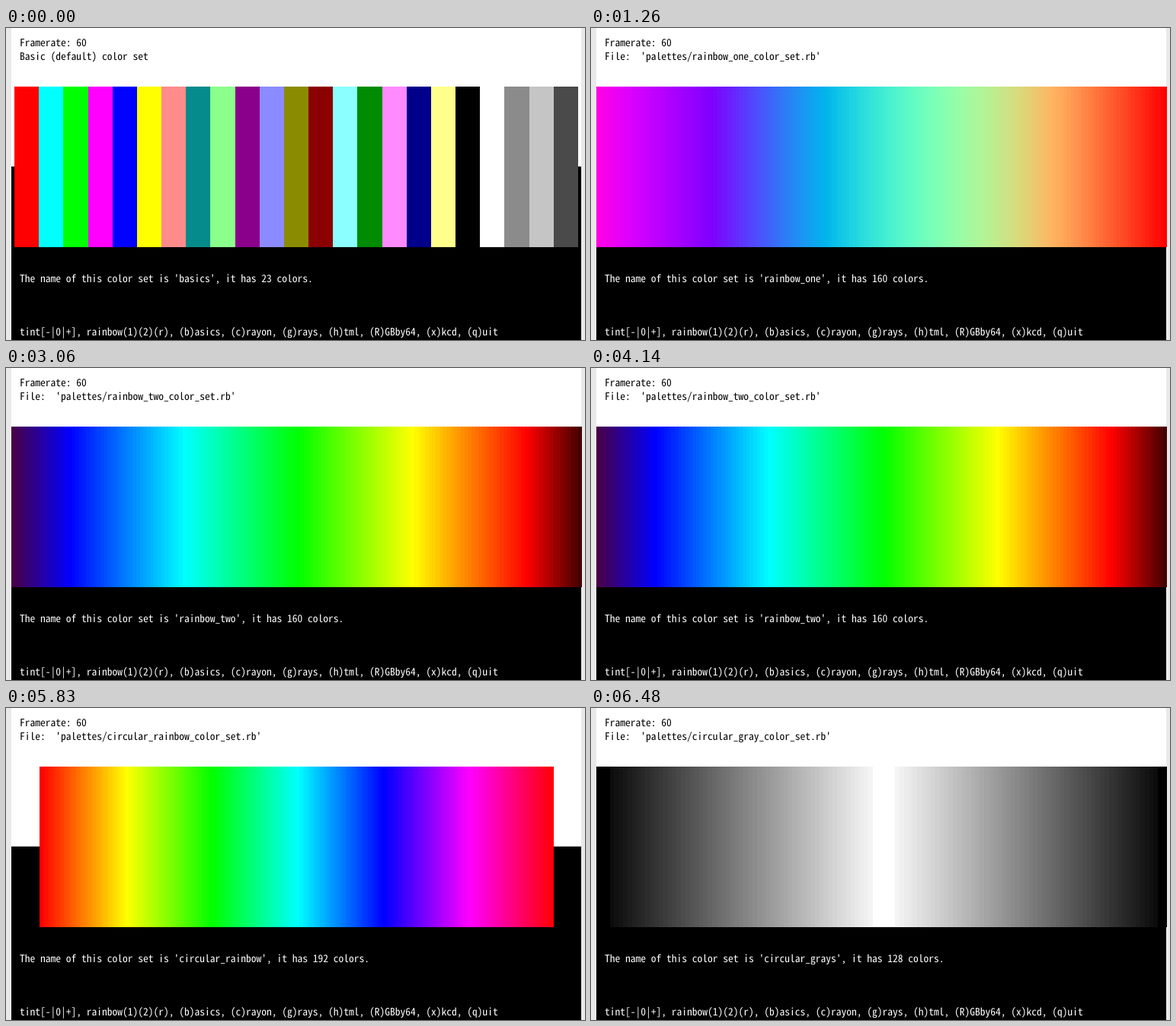
An HTML page with a canvas that plays this animation: 760x410 px, repeating every 8000 ms.

```html
<!DOCTYPE html>
<html lang="en">
<head>
<meta charset="utf-8">
<title>Color sets</title>
<style>
  html, body { margin: 0; width: 100%; height: 100%; overflow: hidden; background: #e9e9e9; }
  canvas, svg { position: absolute; left: 0; top: 0; display: block; }
  text {
    font-family: "Noto Sans Mono CJK JP", "Noto Sans Mono", "DejaVu Sans Mono", monospace;
    font-size: 13.5px;
    font-size-adjust: ch-width 0.5;
    text-rendering: geometricPrecision;
    white-space: pre;
    fill: #fff;
  }
  .dark { fill: #000; }
</style>
</head>
<body>
<canvas id="stage" width="760" height="410"></canvas>
<svg width="760" height="410">
  <text class="dark" x="18" y="24">Framerate: 60</text>
  <text class="dark" id="source" x="18" y="42"></text>
  <text id="summary" x="18" y="334"></text>
  <text x="18" y="404">tint[-|0|+], rainbow(1)(2)(r), (b)asics, (c)rayon, (g)rays, (h)tml, (R)GBby64, (x)kcd, (q)uit</text>
</svg>
<script>
const LOOP = 8000;
const ctx = document.getElementById('stage').getContext('2d');
const source = document.getElementById('source');
const summary = document.getElementById('summary');

const rgb = (r, g, b) => `rgb(${[r, g, b].map(Math.round).join()})`;
const range = (n, fn) => Array.from({ length: n }, (_, i) => fn(i));

// Evenly stepped colors from one [r, g, b] to the next.
const ramp = (from, to, n) =>
  range(n, i => rgb(...from.map((v, k) => v + (to[k] - v) * i / n)));

// Joins ramps of the given lengths through a list of key colors.
const ramps = (keys, lengths) =>
  lengths.flatMap((n, i) => ramp(keys[i], keys[i + 1], n));

const RED = [255, 0, 0], YELLOW = [255, 255, 0], GREEN = [0, 255, 0];
const CYAN = [0, 255, 255], BLUE = [0, 0, 255], MAGENTA = [255, 0, 255];

const basics = ('f00 0ff 0f0 f0f 00f ff0 ff8b8b 058b8b 8bff8b 8b008b 8b8bff 8b8b00 ' +
  '8b0000 8bffff 008b00 ff8bff 00008b ffff8b 000 fff 8b8b8b c5c5c5 4a4a4a')
  .split(' ').map(hex => '#' + hex);

const rainbowOne = [
  ...range(32, i => rgb(255 - 4 * i, 0, Math.min(255, 228 + 3 * i))),
  ...range(128, i => {
    const t = i / 127;
    return rgb(255 * Math.min(1, Math.abs(2 * t - 0.5)),
      255 * Math.sin(Math.PI * t), 255 * Math.cos(Math.PI * t / 2));
  })
];

const rainbowTwo = ramps(
  [[72, 0, 72], BLUE, CYAN, GREEN, YELLOW, RED, [56, 0, 0]],
  [16, 32, 32, 32, 32, 16]);

const circularRainbow = ramps(
  [RED, YELLOW, GREEN, CYAN, BLUE, MAGENTA, RED], Array(6).fill(32));

const circularGrays = range(128, i => {
  const v = 4 * Math.min(i, 128 - i);
  const gray = v < 12 ? 0 : v >= 248 ? 255 : v;
  return rgb(gray, gray, gray);
});

const file = name => `File:  'palettes/${name}_color_set.rb'`;

const scenes = [
  { start: 0, title: 'Basic (default) color set', name: 'basics', colors: basics, left: 11, right: 751 },
  { start: 1260, title: file('rainbow_one'), name: 'rainbow_one', colors: rainbowOne, left: 7, right: 756 },
  { start: 3060, title: file('rainbow_two'), name: 'rainbow_two', colors: rainbowTwo, left: 7, right: 756 },
  { start: 4860, title: file('circular_rainbow'), name: 'circular_rainbow', colors: circularRainbow, left: 44, right: 719 },
  { start: 6480, title: file('circular_gray'), name: 'circular_grays', colors: circularGrays, left: 7, right: 756 }
];

function fill(color, x, y, w, h) {
  ctx.fillStyle = color;
  ctx.fillRect(x, y, w, h);
}

function draw({ title, name, colors, left, right }) {
  fill('#e9e9e9', 0, 0, 760, 410);
  fill('#fff', 7, 0, 748, 182);
  fill('#000', 7, 182, 748, 228);
  const edge = i => Math.round(left + (right - left) * i / colors.length);
  colors.forEach((color, i) => fill(color, edge(i), 77, edge(i + 1) - edge(i), 211));
  source.textContent = title;
  summary.textContent = `The name of this color set is '${name}', it has ${colors.length} colors.`;
}

let shown;
const begin = performance.now();

function tick() {
  const time = (performance.now() - begin) % LOOP;
  const scene = scenes.findLast(s => time >= s.start);
  if (scene !== shown) draw(shown = scene);
  requestAnimationFrame(tick);
}
tick();
</script>
</body>
</html>
```
